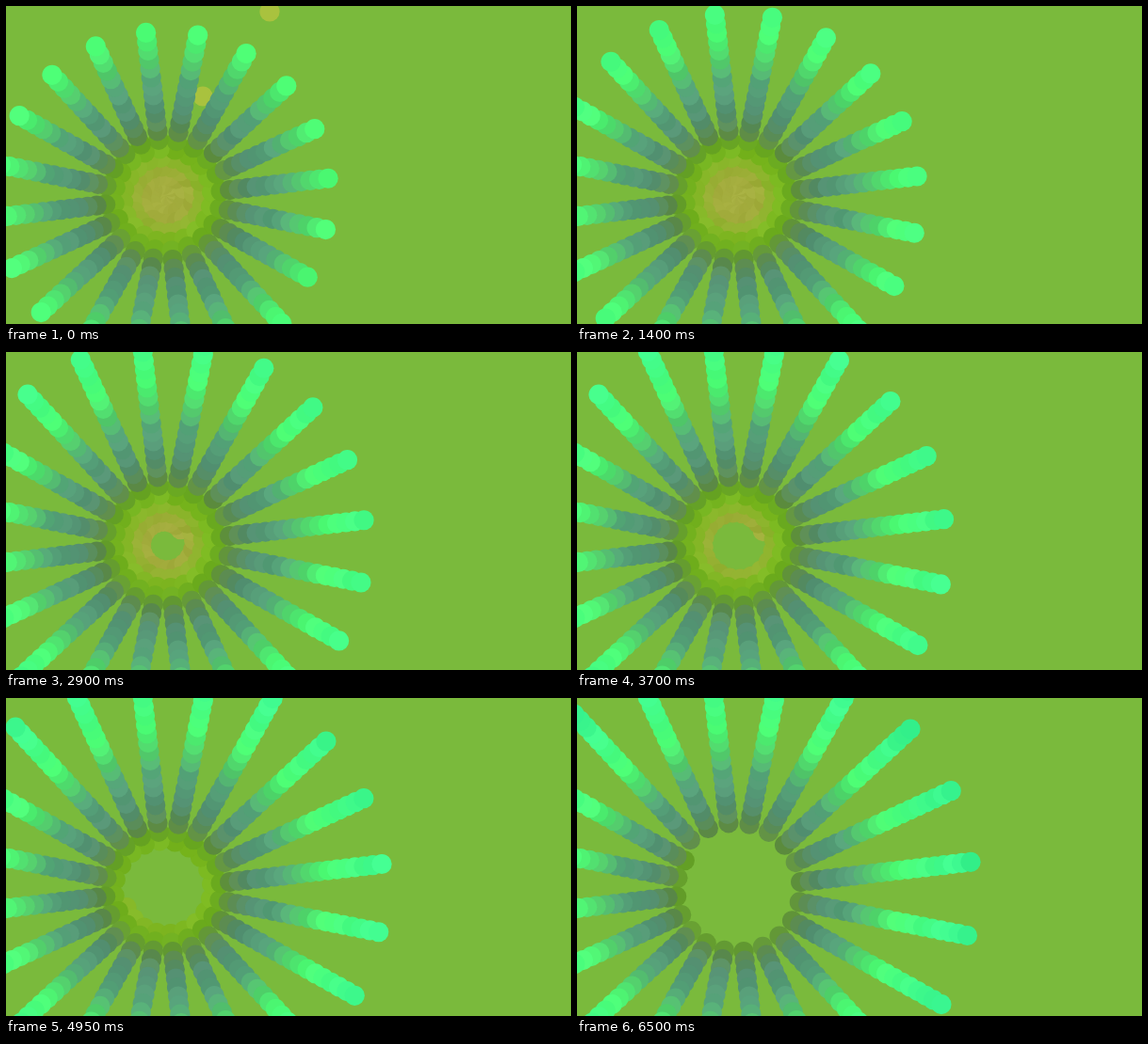
Recreate the animation shown at these times as an HTML page with a canvas. Size 600x338 px, loop 6550 ms.

```html
<!DOCTYPE html>
<html lang="en">
<head>
<meta charset="utf-8">
<title>Spiral of dots</title>
<style>
  html, body { margin: 0; width: 100%; height: 100%; overflow: hidden; background: #7aba3c; }
  canvas { display: block; width: 600px; height: 338px; }
</style>
</head>
<body>
<canvas id="stage" width="600" height="338"></canvas>
<script>
const canvas = document.getElementById('stage');
const ctx = canvas.getContext('2d');
const LOOP = 6550, TICK = 50;
const CENTER = { x: 169.3, y: 203.6 };
const DOT = 10.6, ARMS = 20, GROWTH = 0.478;
const FIRST = -362, LENGTH = 405;

// One strip holds the colour of every dot by its distance from the centre
const REACH = 260;
const STOPS = {
  0: '#acb448', 30: '#a2ac3c', 50: '#7cba20', 61: '#68a81e',
  72: '#5f8c48', 95: '#549072', 128: '#56a47a', 150: '#52cc6a',
  176: '#4eff76', 225: '#42fc8e', 256: '#34f08c'
};

function makeStrip() {
  const c = document.createElement('canvas').getContext('2d');
  c.canvas.width = REACH;
  c.canvas.height = 1;
  const ramp = c.createLinearGradient(0, 0, REACH, 0);
  for (const r in STOPS) ramp.addColorStop(r / REACH, STOPS[r]);
  c.fillStyle = ramp;
  c.fillRect(0, 0, REACH, 1);
  return c.getImageData(0, 0, REACH, 1).data;
}
const strip = makeStrip();

// Small fixed variation from dot to dot
function wobble(n) {
  const v = Math.sin(n * 12.9898) * 43758.5453;
  return (v - Math.floor(v) - 0.5) * 10;
}

function makeDot(n) {
  const r = GROWTH * (n - FIRST);
  const angle = 0.511 - n * 2 * Math.PI / ARMS;
  const i = Math.min(REACH - 1, Math.round(r)) * 4;
  const rgb = Array.from(strip.slice(i, i + 3), v => v + wobble(n));
  return {
    n,
    x: CENTER.x + r * Math.cos(angle),
    y: CENTER.y + r * Math.sin(angle),
    color: `rgb(${rgb.map(Math.round).join(',')})`
  };
}

const headAt = step => Math.floor(19.5 + 1.2 * step);

// Two stray dots lead in to the spiral
const dots = [
  { n: FIRST - 2, x: 280, y: 6, color: '#a9c23e' },
  { n: FIRST - 1, x: 209, y: 96, color: '#a9c23e' }
];
for (let n = FIRST; n <= headAt(LOOP / TICK); n++) dots.push(makeDot(n));

function draw(step) {
  const head = headAt(step);
  ctx.fillStyle = '#7aba3c';
  ctx.fillRect(0, 0, canvas.width, canvas.height);
  for (const d of dots) {
    if (d.n < head - LENGTH || d.n > head) continue;
    ctx.fillStyle = d.color;
    ctx.beginPath();
    ctx.arc(d.x, d.y, DOT, 0, Math.PI * 2);
    ctx.fill();
  }
}

const start = performance.now();
function frame() {
  const t = (performance.now() - start) % LOOP;
  draw(Math.floor(t / TICK));
  requestAnimationFrame(frame);
}
frame();
</script>
</body>
</html>
```
